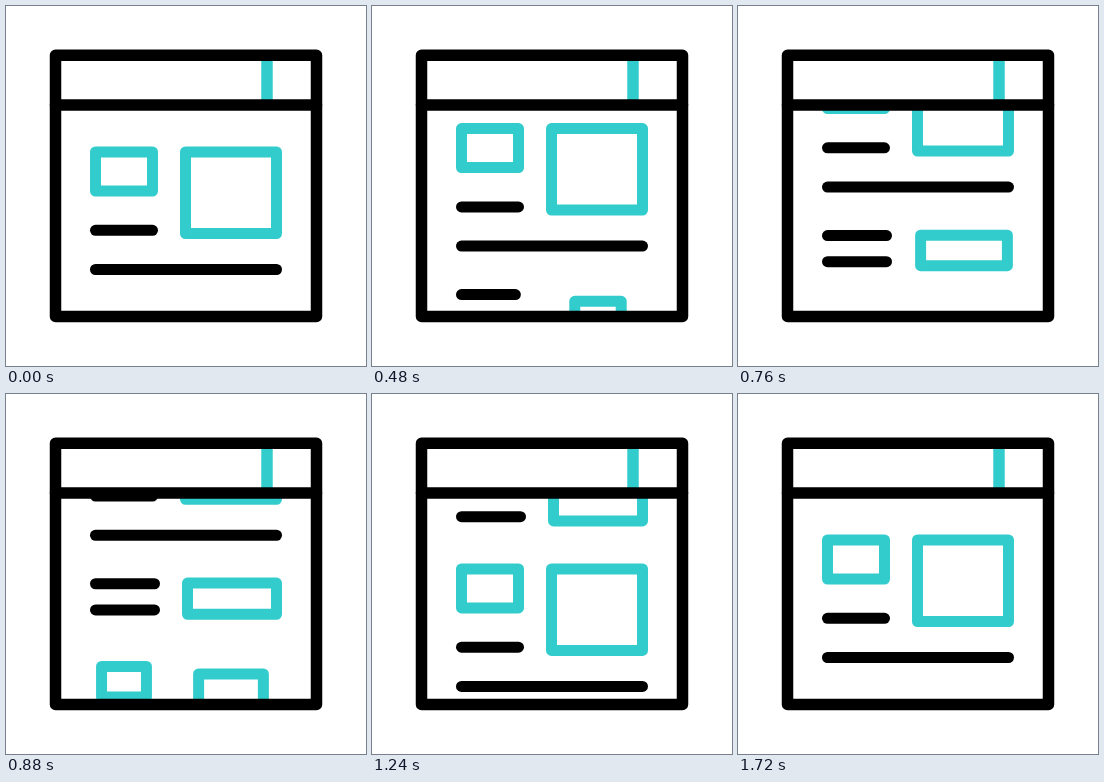
An HTML page with a canvas that plays this animation: 360 by 360 pixels, repeating every 2 s.

```html
<!DOCTYPE html>
<html lang="en">
<head>
<meta charset="utf-8">
<title>Scrolling page icon</title>
<style>
  html, body { margin: 0; width: 100%; height: 100%; overflow: hidden; background: #fff; }
  canvas { display: block; width: 360px; height: 360px; }
</style>
</head>
<body>
<canvas id="stage" width="360" height="360"></canvas>
<script>
const ctx = document.getElementById('stage').getContext('2d');
const BLACK = '#000', TEAL = '#33cccc';
const LOOP = 2000, STEP = 40;
const SCROLL = { start: 40, length: 1680, distance: 244.5 };
const GROW = 525;

const clamp = x => Math.min(1, Math.max(0, x));

// Symmetric ease-in-out: cubic-bezier(.58, 0, .42, 1)
function easeInOut(x) {
  const a = 0.58;
  let lo = 0, hi = 1;
  for (let i = 0; i < 30; i++) {
    const s = (lo + hi) / 2, r = 1 - s;
    const bx = 3 * a * s * r * r + 3 * (1 - a) * s * s * r + s * s * s;
    if (bx < x) lo = s; else hi = s;
  }
  return lo * lo * (3 - 2 * lo);
}

// Ease-out growth from 0 to 1, starting at the given time
const grown = (t, start) => 1 - (1 - clamp((t - start) / GROW)) ** 2;

function line(x1, y1, x2, y2, color = BLACK) {
  ctx.strokeStyle = color;
  ctx.beginPath();
  ctx.moveTo(x1, y1);
  ctx.lineTo(x2, y2);
  ctx.stroke();
}

// Horizontal line that extends from its left end
function bar(x1, x2, y, k) {
  if (k > 0) line(x1, y, x1 + (x2 - x1) * k, y);
}

// Outlined box that scales about its centre at constant stroke width
function box(x1, y1, x2, y2, k, color = TEAL) {
  if (k <= 0) return;
  const w = (x2 - x1) * k, h = (y2 - y1) * k;
  ctx.strokeStyle = color;
  ctx.strokeRect((x1 + x2 - w) / 2, (y1 + y2 - h) / 2, w, h);
}

function article(dy, growth) {
  box(89.5, 146 + dy, 146.5, 185 + dy, growth(0));
  box(179.5, 146 + dy, 270.5, 227.5 + dy, growth(1));
  bar(89.5, 146.5, 224.3 + dy, growth(2));
  bar(89.5, 270.5, 263.5 + dy, growth(3));
}

function footer(dy, t) {
  bar(89.5, 148.5, 312 + dy, grown(t, 110));
  bar(89.5, 148.5, 338.2 + dy, grown(t, 150));
  box(181.5, 311.3 + dy, 270.5, 342.5 + dy, grown(t, 318));
}

function draw(t) {
  const progress = easeInOut(clamp((t - SCROLL.start) / SCROLL.length));
  const dy = -SCROLL.distance * progress;

  ctx.fillStyle = '#fff';
  ctx.fillRect(0, 0, 360, 360);
  ctx.lineJoin = ctx.lineCap = 'round';

  ctx.save();
  ctx.beginPath();
  ctx.rect(49.5, 99, 261, 211);
  ctx.clip();
  ctx.lineWidth = 11;
  article(dy, () => 1);
  footer(dy, t);
  article(dy + SCROLL.distance, i => grown(t, 597 + 40 * i));
  ctx.restore();

  ctx.lineWidth = 11.5;
  line(261, 55, 261, 94, TEAL);
  box(49.5, 49.3, 310.5, 310.5, 1, BLACK);
  line(49.5, 99, 310.5, 99);
}

function frame() {
  const t = performance.now() % LOOP;
  draw(Math.floor(t / STEP) * STEP);
  requestAnimationFrame(frame);
}
frame();
</script>
</body>
</html>
```
